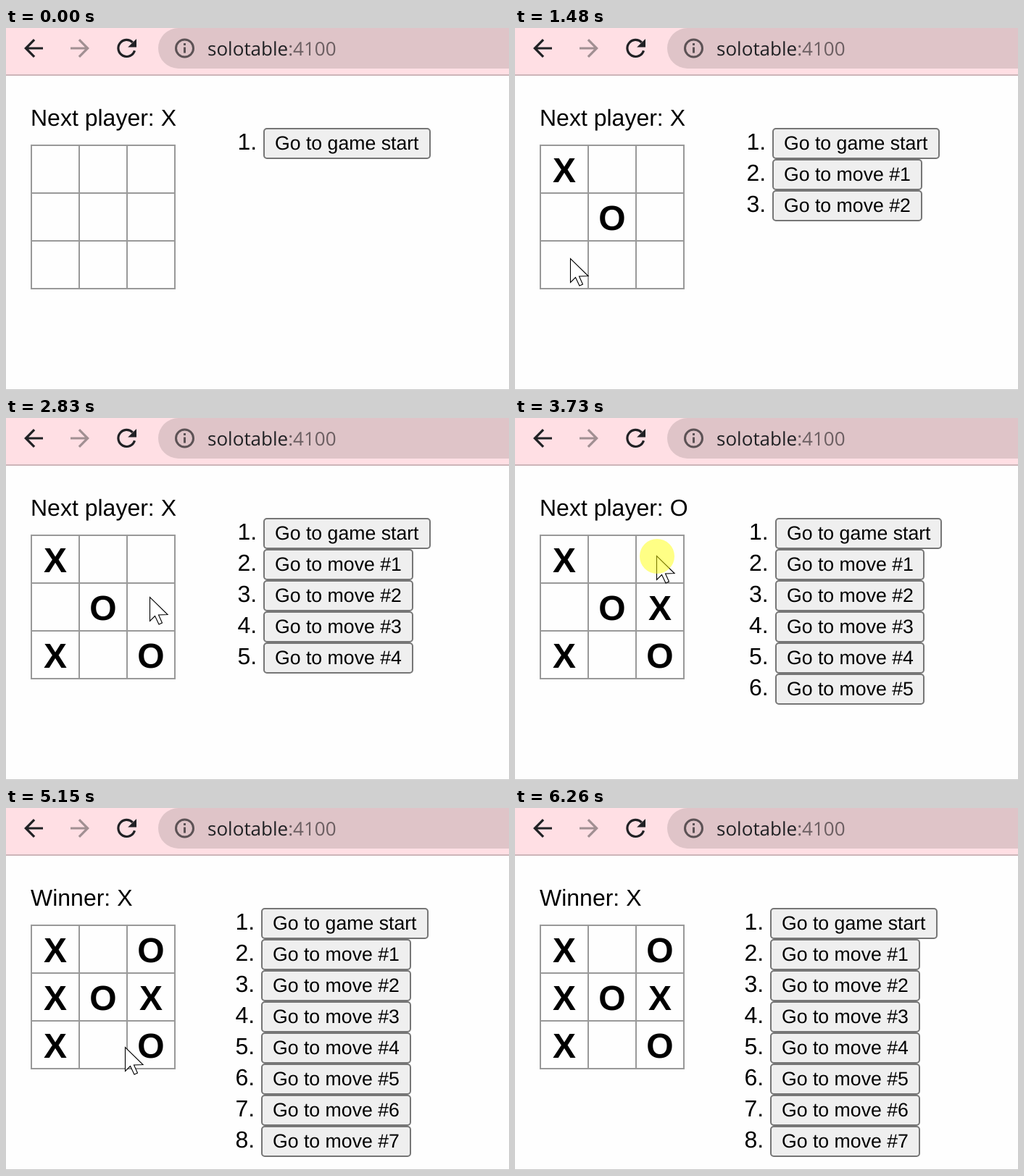
An HTML page for the animation above (6750 ms loop, 694 by 500 pixels).

```html
<!DOCTYPE html>
<html lang="en">
<head>
<meta charset="utf-8">
<title>Tic-tac-toe</title>
<style>
  html, body { margin: 0; width: 100%; height: 100%; overflow: hidden; background: #fefefe; }
  svg { display: block; width: 694px; height: 500px; }
  text { font-family: "Liberation Sans", Arial, sans-serif; font-size: 32px; white-space: pre; text-rendering: geometricPrecision; }
  .mark { font-size: 48px; font-weight: bold; text-anchor: middle; }
  .label { font-size: 26.667px; }
  .url { font-family: "Open Sans", "Noto Sans", sans-serif; font-size: 26px; fill: #202124; }
  .port { fill: #6b5e61; }
  .button { fill: #efefef; stroke: #767676; stroke-width: 2; }
  .icon { fill: none; stroke: #202124; stroke-width: 3.2; }
  .faded { stroke: #a18f92; }
  .info { stroke: #5c5255; stroke-width: 3; }
</style>
</head>
<body>
<svg viewBox="0 0 694 500">
  <rect width="694" height="500" fill="#fefefe"/>
  <rect width="694" height="64" fill="#ffdfe4"/>
  <rect y="64" width="694" height="2" fill="#cdb5b9"/>
  <rect x="210" width="520" height="56" rx="28" fill="#dfc4c8"/>
  <defs><path id="arrow" d="M51 28H28M39.1 16.1L27.3 28L39.1 39.9"/></defs>
  <use href="#arrow" class="icon"/>
  <use href="#arrow" class="icon faded" transform="rotate(180 70 28)"/>
  <path class="icon" d="M174.700 19.800A11.550 11.550 0 1 0 177.500 31.300"/>
  <path d="M180 15V26.500H168.200Z" fill="#202124"/>
  <circle class="icon info" cx="246.500" cy="28" r="12"/>
  <path class="icon info" d="M246.500 21V24M246.500 26.500V34.500"/>
  <text class="url" x="278" y="38">solotable<tspan class="port">:4100</tspan></text>

  <text id="status" x="34" y="135"></text>
  <path id="grid" stroke="#999" stroke-width="2"/>
  <g id="marks"></g>
  <g id="list"></g>
  <rect y="499" width="694" height="1" fill="#c8c8c8"/>

  <g id="pointer">
    <path d="M-.5 -.5V32.500L6.500 25.500L12 37L16.500 35L11.500 24L24 23.500Z" fill="#fff" stroke="#000" stroke-width="1.100"/>
    <circle id="press" r="24" fill="#ff0" opacity=".48"/>
  </g>
</svg>
<script>
const LOOP = 6750, SETTLE = 100;
const LEFT = 34, TOP = 161, CELL = 66, ROW = 43;
const $ = id => document.getElementById(id);
const stop = (from, to, x, y) => ({ from, to, x, y });

// Each click: mouse down, mouse up, place
const clicks = [
  stop(571, 723, 72, 178), stop(1140, 1280, 133, 272), stop(1651, 1726, 66, 328),
  stop(2290, 2430, 196, 328), stop(2973, 3120, 199, 246), stop(3730, 3860, 196, 191),
  stop(4400, 4540, 70, 260)
];
const stops = [stop(190, 190, 150, 318), ...clicks, stop(5440, 5720, 181, 343), stop(6260, LOOP, 200, 502)];

// The pointer leaves a stop at once and settles shortly before the next event
function pointerAt(t) {
  const i = stops.findLastIndex(s => s.to <= t);
  if (i < 0) return null;
  const a = stops[i], b = stops[i + 1];
  const u = Math.min(1, (t - a.to) / (b.from - SETTLE - a.to));
  const e = u * u * (3 - 2 * u);
  return [a.x + (b.x - a.x) * e, a.y + (b.y - a.y) * e].map(Math.round);
}

const player = i => i % 2 ? "O" : "X";

function mark({ x, y }, i) {
  const col = Math.floor((x - LEFT) / CELL), line = Math.floor((y - TOP) / CELL);
  return `<text class="mark" x="${LEFT + 34 + CELL * col}" y="${TOP + 52 + CELL * line}">${player(i)}</text>`;
}

function row(i, left) {
  const y = 138 + ROW * i, x = Math.round(left);
  const w = Math.round(left + (i ? 206.8 : 230.6)) - x;
  const label = i ? `Go to move #${i}` : "Go to game start";
  return `<text x="${left - 35.6}" y="${y + 30}">${i + 1}.</text>
    <rect class="button" x="${x + 1}" y="${y + 1}" width="${w - 2}" height="${ROW - 2}" rx="4"/>
    <text class="label" x="${x + 16}" y="${y + 30}">${label}</text>`;
}

function showBoard(count) {
  const won = count === clicks.length;
  const left = won ? 352 : count % 2 ? 358.6 : 355;
  $("status").textContent = won ? "Winner: X" : "Next player: " + player(count);
  $("marks").innerHTML = clicks.slice(0, count).map(mark).join("");
  $("list").innerHTML = Array.from({ length: count + 1 }, (_, i) => row(i, left)).join("");
}

function drawGrid() {
  const size = 3 * CELL + 2;
  let d = "";
  for (let i = 0; i <= 3; i++) {
    const p = 1 + CELL * i;
    d += `M${LEFT} ${TOP + p}h${size}M${LEFT + p} ${TOP}v${size}`;
  }
  $("grid").setAttribute("d", d);
}

const toggle = (id, on) => { $(id).style.display = on ? "" : "none"; };

let shown = -1;
function frame() {
  const t = performance.now() % LOOP;
  const count = clicks.filter(c => c.to <= t).length;
  if (count !== shown) showBoard(shown = count);
  const at = pointerAt(t);
  toggle("pointer", at);
  toggle("press", clicks.some(c => t >= c.from && t < c.to));
  if (at) $("pointer").setAttribute("transform", `translate(${at})`);
  requestAnimationFrame(frame);
}
drawGrid();
frame();
</script>
</body>
</html>
```
